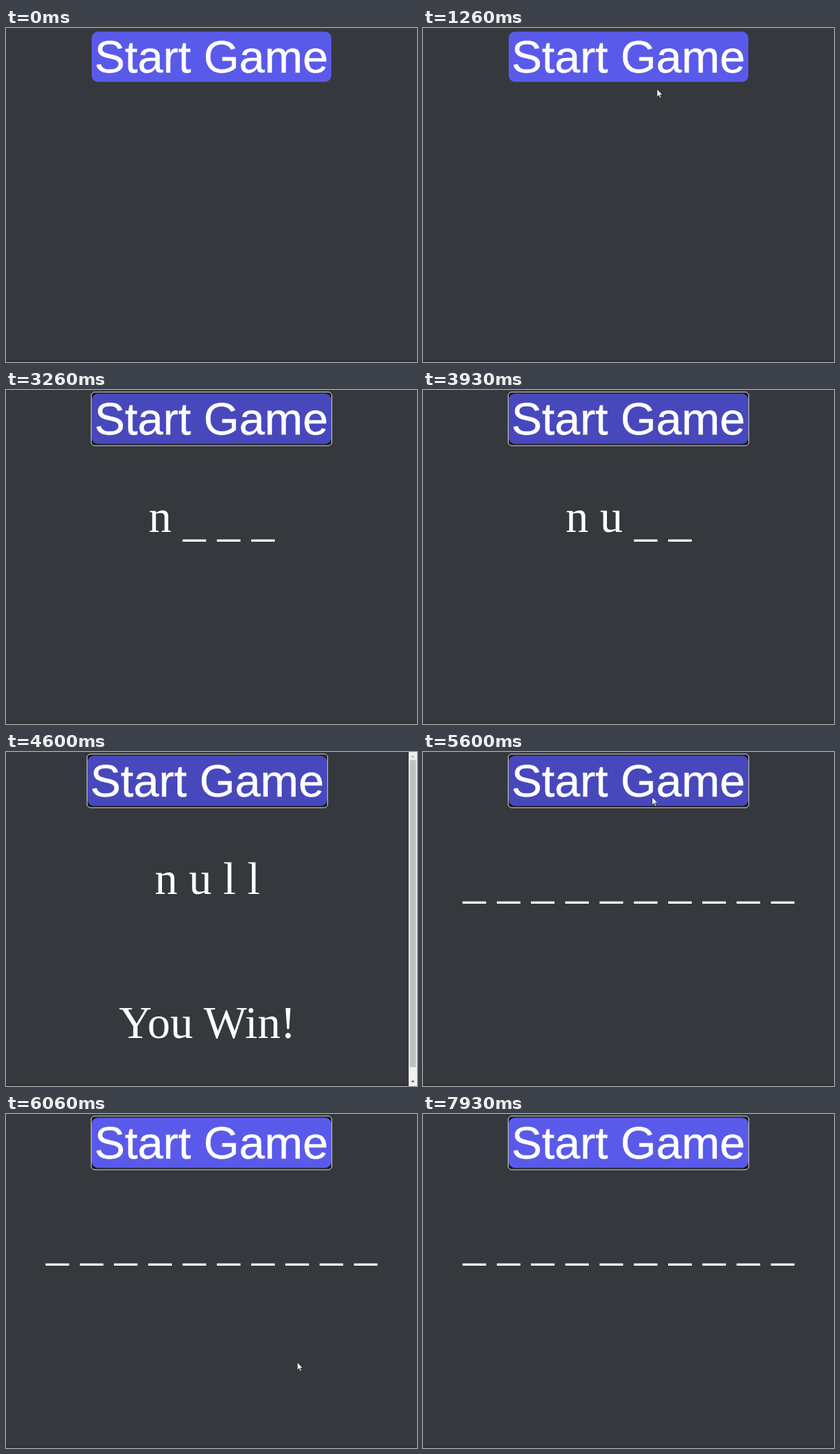
Animation, 590 px wide and 480 px high, one loop 8 s. Source, as an HTML page:

```html
<!DOCTYPE html>
<html lang="en">
<head>
<meta charset="utf-8">
<title>Word game</title>
<style>
  html, body { margin: 0; width: 100%; height: 100%; overflow: hidden; background: #35383c; }
  svg { display: block; }
  text { fill: #fff; font-size: 65.6px; text-anchor: middle; white-space: pre; }
  .sans { font-family: "Liberation Sans", Arial, sans-serif; stroke: #fff; stroke-width: .5; }
  .serif { font-family: "Liberation Serif", "Times New Roman", serif; }
  .blank { baseline-shift: -6px; }
</style>
</head>
<body>
<svg width="590" height="480" viewBox="0 0 590 480">
  <rect width="590" height="480" fill="#35383c"/>
  <rect y="477" width="590" height="3" fill="#322f35"/>
  <g id="page">
    <path id="ring" d="M126 3H464L467.7 6V77L464 80H126L122.3 77V6Z" fill="#1a1b1f" stroke="#f4f4f4" stroke-width=".9"/>
    <rect id="button" x="123" y="5.3" width="344" height="72.2" rx="9"/>
    <text class="sans" x="294.7" y="64">Start Game</text>
    <text id="word" class="serif" x="295" y="204"></text>
    <text id="win" class="serif" x="295" y="410.5">You Win!</text>
  </g>
  <g id="bar">
    <rect x="578" width="12" height="480" fill="#f1f1f1"/>
    <rect x="579.5" y="11.5" width="9" height="441.5" fill="#c1c1c1"/>
    <path d="M581.5 7.5L584 4.8L586.5 7.5Z" fill="#a3a3a3"/>
    <path d="M581.5 472.5L584 475.2L586.5 472.5Z" fill="#505050"/>
  </g>
  <path id="cursor" d="M0 0V11L2.5 8.6L4.3 12.6L6 11.9L4.2 8H7.7Z" fill="#fff" stroke="#1c1d20" stroke-width=".6"/>
</svg>
<script>
const LOOP = 8000, FRAME = 1000 / 15;
const ENTER = 1000, START = 1800, WIN = 4600, RESTART = 5600, LEAVE = 5800, GONE = 6130;
const SECRET = "null", NEXT_LENGTH = 10;
const guessTimes = { n: 3260, u: 3730, l: WIN };

const el = id => document.getElementById(id);
const [page, ring, button, word, win, bar, cursor] =
  ["page", "ring", "button", "word", "win", "bar", "cursor"].map(el);
const clamp = v => Math.min(1, Math.max(0, v));
const show = (node, on) => node.setAttribute("visibility", on ? "visible" : "hidden");

function letters(t) {
  if (t < START) return [];
  if (t >= RESTART) return Array(NEXT_LENGTH).fill("_");
  return [...SECRET].map(c => t >= guessTimes[c] ? c : "_");
}

// The pointer eases in to the button and later speeds away along the same line.
function pointer(t) {
  const time = Math.floor((t + 7) / FRAME) * FRAME;
  const away = t < RESTART
    ? (1 - clamp((time - ENTER) / 400)) ** 1.75
    : 2.7 * clamp((time - LEAVE) / (GONE - LEAVE)) ** 1.75;
  return [329 + 48 * away, 65 + 157 * away];
}

let shown = "";
function setWord(chars) {
  const markup = chars.map(c => c === "_" ? '<tspan class="blank">_</tspan>' : c).join(" ");
  if (markup !== shown) word.innerHTML = shown = markup;
}

function draw(t) {
  const won = t >= WIN && t < RESTART;
  const spot = pointer(t);
  const hover = spot[1] < 77 && t >= ENTER;
  setWord(letters(t));
  button.setAttribute("fill", hover ? "#4848bd" : "#5a5aea");
  page.setAttribute("transform", `translate(${won ? -6 : 0} 0)`);
  cursor.setAttribute("transform", `translate(${spot})`);
  show(ring, t >= guessTimes.n);
  show(win, won);
  show(bar, won);
  show(cursor, t >= ENTER && t < guessTimes.n || t >= RESTART && t < GONE);
}

function tick() {
  draw(performance.now() % LOOP);
  requestAnimationFrame(tick);
}
tick();
</script>
</body>
</html>
```
